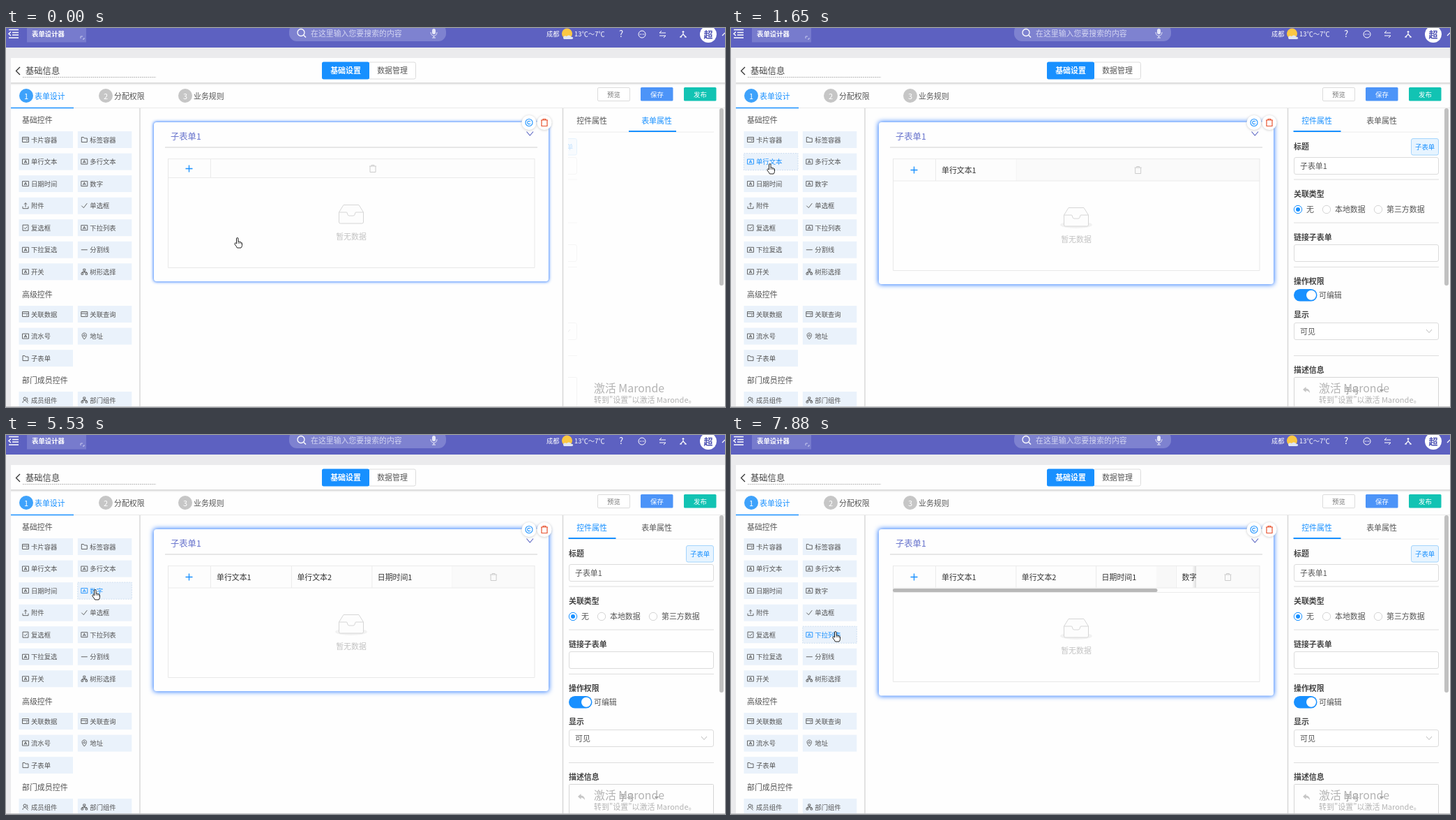
An HTML page for the animation above (8000 ms loop, 1031 by 543 pixels).

```html
<!DOCTYPE html>
<html lang="zh-CN">
<head>
<meta charset="utf-8">
<title>表单设计器</title>
<style>
html, body { margin: 0; width: 100%; height: 100%; overflow: hidden; background: #ebebed; }
svg { display: block; font-family: "Noto Sans CJK SC", "Noto Sans CJK", "Noto Sans", sans-serif; }
text { white-space: pre; }
</style>
</head>
<body>
<svg id="stage" width="1031" height="543" viewBox="0 0 1031 543"></svg>
<script>
const BLUE = '#1890ff', INK = '#555', LINE = '#dcdcdc';

// Drawing helpers; text is placed by its left edge and vertical centre.
const text = (x, y, size, s, fill = INK, more = '') =>
  `<text x="${x}" y="${y + size * .38}" font-size="${size}" fill="${fill}" ${more}>${s}</text>`;
const rect = (x, y, w, h, fill, more = '') =>
  `<rect x="${x}" y="${y}" width="${w}" height="${h}" fill="${fill}" ${more}/>`;
const box = (x, y, w, h, stroke = LINE, fill = '#fff', r = 2.5) =>
  rect(x + .5, y + .5, w - 1, h - 1, fill, `rx="${r}" stroke="${stroke}"`);
const path = (d, stroke = INK, width = 1, more = '') =>
  `<path d="${d}" fill="none" stroke="${stroke}" stroke-width="${width}" ${more}/>`;
const circle = (x, y, r, fill, more = '') =>
  `<circle cx="${x}" cy="${y}" r="${r}" fill="${fill}" ${more}/>`;
const hline = (x1, x2, y, color = LINE, width = 1) => path(`M${x1} ${y}H${x2}`, color, width);
const vline = (x, y1, y2, color = '#ebebeb', width = 1) => path(`M${x} ${y1}V${y2}`, color, width);
const at = (x, y, s, more = '') => `<g transform="translate(${x} ${y})" ${more}>${s}</g>`;
const BOLD = 'font-weight="bold"', MID = 'text-anchor="middle"';

const TRASH = 'M-5 -3.5H5M-2 -3.5V-5H2V-3.5M-4 -3.5V5H4V-3.5';
const ICONS = {
  card: 'M-4.5 -3.5H4.5V3.5H-4.5ZM-4.5 -1H4.5M1 1.2H3',
  folder: 'M-4 -3.5H-1L0 -2H4V3.5H-4Z',
  field: 'M-4.5 -3.5H4.5V3.5H-4.5ZM-2 2L0 -2L2 2M-1.2 .8H1.2',
  upload: 'M-4 1V4H4V1M0 2V-4M-2 -2L0 -4L2 -2',
  tick: 'M-4 0L-1 3L4 -3.5',
  check: 'M-4 -4H4V4H-4ZM-2 0L-.5 1.6L2.3 -1.6',
  dash: 'M-4.5 0H4.5',
  tree: 'M-1.5 -4H1.5V-1.5H-1.5ZM0 -1.5V1.5M-3 1.5V.3H3V1.5M-4.3 1.5H-1.7V4H-4.3ZM1.7 1.5H4.3V4H1.7Z',
  pin: 'M0 4.5C-5 -1 -3.5 -4.5 0 -4.5S5 -1 0 4.5ZM-1.3 -1A1.3 1.3 0 1 0 1.3 -1A1.3 1.3 0 1 0 -1.3 -1',
  user: 'M-3 -2A2 2 0 1 0 1 -2A2 2 0 1 0 -3 -2M-4 4C-4 0 0 0 1 2L3.5 4.5M2 -3.5Q4 -2 2 .5L4 2'
};
const GROUPS = [
  [132, '基础控件', 'card 卡片容器,folder 标签容器,field 单行文本,field 多行文本,field 日期时间,field 数字,upload 附件,tick 单选框,check 复选框,field 下拉列表,field 下拉复选,dash 分割线,field 开关,tree 树形选择'],
  [382, '高级控件', 'card 关联数据,card 关联查询,field 流水号,pin 地址,folder 子表单'],
  [505, '部门成员控件', 'user 成员组件,tree 部门组件']
];

// time, pointer x, pointer y, hovered control
const STEPS = [
  [0, 333, 308], [400, 290, 292], [520, 228, 264], [640, 161, 239], [790, 66, 211],
  [940, 57, 204, '单行文本'], [1090, 57, 203, '单行文本'], [1650, 57, 202, '单行文本'],
  [3170, 57, 214], [3290, 58, 229, '日期时间'], [3410, 59, 239, '日期时间'],
  [3560, 60, 235, '日期时间'], [3710, 59, 232, '日期时间'], [3830, 59, 229, '日期时间'],
  [5380, 86, 228, '日期时间'], [5530, 129, 229, '数字'], [7040, 130, 230, '数字'],
  [7190, 140, 260, '单选框'], [7340, 147, 275], [7490, 150, 286, '下拉列表'], [7610, 151, 289, '下拉列表']
];
const COLUMN_TIMES = [1370, 2770, 4100, 6350, 7880];
const COLUMNS = ['单行文本1', '单行文本2', '日期时间1', '数字1'];

function topBar() {
  const white = (d, w = 1.2) => path(d, '#fff', w);
  return rect(0, 0, 1031, 28, '#5d61c1') + rect(30, 0, 85, 20.5, '#777bcd')
    + white('M4 2.5H18M9 6.5H18M9 10H18M4 14H18M7 5.5L4 8.3L7 11', 1.5)
    + text(37, 8, 9.4, '表单设计器', '#fff', BOLD)
    + path('M107 12H110M107 12V15M110 16H112V14', '#c8caef')
    + rect(406, -6, 225, 25, '#7e82d0', 'rx="11"')
    + circle(423, 6.5, 5, 'none', 'stroke="#fff" stroke-width="1.3"') + white('M427 10.5L430 13.5', 1.4)
    + text(437, 8, 10.9, '在这里输入您要搜索的内容', '#d3d5f2')
    + rect(611, 1, 5, 8, '#e6e7f8', 'rx="2.5"') + path('M609 6C609 13 618 13 618 6M613.5 11V14M611 14H616', '#e6e7f8')
    + text(775, 8.5, 9.2, '成都', '#fff') + circle(804.5, 8, 7.5, '#fbc743')
    + `<path d="M800 16C797 12 802 10 804 12C807 9 810 11 810 12.5C814 12.5 814 16 811 16Z" fill="#dfe5f4"/>`
    + text(815, 8.5, 9.4, '13℃～7℃', '#fff')
    + text(882, 8.5, 13, '?', '#fff', MID)
    + circle(912, 9, 5, 'none', 'stroke="#fff"') + white('M909 9H910M911.5 9H912.5M914 9H915', 1.3)
    + white('M946 7H937L940 4M937 11H946L943 14', 1)
    + white('M971 4V9L967 13M971 9L975 13M969.5 5.5H972.5M966 13H969M973 13H976', 1.2)
    + circle(1007, 9, 12, '#fff') + text(1007, 9, 13, '超', '#4d52b4', `${BOLD} ${MID}`)
    + white('M1027 11L1031 7');
}

function pageHead() {
  const step = (x, n, label, on) => circle(x, 97, 10, on ? '#3ea2fb' : '#c6c6c6')
    + text(x, 97.5, 11, n, '#fff', MID) + text(x + 12, 97.5, 10.95, label, on ? BLUE : INK);
  const button = (x, label, fill) => rect(x, 85, 46.5, 19.5, fill, 'rx="1.5"')
    + text(x + 23.5, 95, 9.4, label, '#fff', MID);
  return rect(7, 43, 1024, 500, '#fefefe')
    + path('M20 56L14.5 61.5L20 67', '#333', 1.3) + text(28, 61.5, 12.3, '基础信息', '#444')
    + path('M24 70.5H215', '#aaa', 1, 'stroke-dasharray="1.6 1.2"')
    + box(519, 48.5, 69, 25) + rect(453, 48.5, 68, 25, BLUE, 'rx="2.5"')
    + text(487, 61, 10.95, '基础设置', '#fff', `${BOLD} ${MID}`) + text(554, 61, 10.95, '数据管理', INK, MID)
    + hline(7, 1031, 79, '#dedede', 2) + hline(7, 1031, 80.7, '#f1f1f1', 1.5)
    + step(29, 1, '表单设计', true) + step(143, 2, '分配权限') + step(257, 3, '业务规则')
    + box(848, 85, 47, 20, LINE, '#fff', 1.5) + text(871.5, 95, 9.4, '预览', '#777', MID)
    + button(910, '保存', '#4c94f8') + button(972, '发布', '#12c3b3')
    + hline(7, 1031, 114.5, '#e9e9e9') + hline(7, 97, 114.5, BLUE, 1.6)
    + vline(192, 115, 543, '#d8d8d8', 1.5) + vline(798.5, 115, 543, '#d8d8d8', 1.5)
    + rect(1023, 115, 6, 254, '#c1c1c1', 'rx="3"');
}

function sidebar(hover) {
  return GROUPS.map(([y, title, items]) => text(23, y, 10.95, title) + items.split(',').map((item, i) => {
    const [icon, label] = item.split(' '), on = label === hover, color = on ? BLUE : INK;
    const x = i % 2 * 84.3, cy = y + 28 + (i >> 1) * 31.55;
    return rect(18.5 + x, cy - 12, 77.5, 24, '#eaf2fb',
        on ? `stroke="#c5d9ee" stroke-width=".8" stroke-dasharray="2 1.5"` : '')
      + at(28 + x, cy, path(ICONS[icon], color, .9)) + text(36 + x, cy, 9.35, label, color);
  }).join('')).join('');
}

function table(n, fresh) {
  const grow = n > 3 ? 10 : n ? 4 : 0, head = n ? 219 : 214.5, bodyEnd = 344 + grow;
  const wide = n > 3, width = wide ? 114.8 : 115.4, left = i => 294 + i * width;
  let s = rect(232, 187, 526, head - 187, '#fdfdfd');
  for (let i = 0; i < Math.min(n, 4); i++)
    s += text(left(i) + 8, 203.5, 10.9, COLUMNS[i], '#333') + vline(left(i + 1), 187.5, head);
  const trashLeft = n === 5 ? 667 : left(n);
  if (n === 5) s += rect(610, 188, 27, 31, '#f8f8f8') + rect(661, 188, 6, 31, 'url(#edge)');
  if (n !== 4) s += rect(trashLeft, 188, 758 - trashLeft, head - 188, n ? '#fafafa' : '#fdfdfd')
    + at((trashLeft + 758) / 2, n ? 203.5 : 201.5, path(TRASH, '#ccc'));
  s += vline(293.5, 187.5, head) + hline(232, 758, 187.5, '#ebebeb') + hline(232, 758, head, '#ebebeb')
    + path(`M232.5 187V${bodyEnd - .5}H758V187`, '#e8e8e8')
    + at(262.5, n ? 203.5 : 201.5, path('M-5 0H5M0 -5V5', BLUE, 1.3));
  if (wide) s += rect(232, 220, n === 5 ? 379.5 : 451, 5, '#b8b8b8', 'rx="2.5"') + hline(232, 758, 225.5, '#ebebeb');
  const tray = (fresh ? '' : '<ellipse cy="11" rx="23" ry="5" fill="#f2f2f2"/>')
    + path('M-17.5 -3L-11 -13.5H11L17.5 -3V11Q17.5 13 15.5 13H-15.5Q-17.5 13 -17.5 11ZM-17.5 -3H-7Q-5.5 -3 -5.5 -1Q-5 2 -3 2H3Q5 2 5.5 -1Q5.5 -3 7 -3H17.5',
      '#d6d6d6', 1, 'style="fill:#fdfdfd"');
  return s + at(495, 267 + grow, tray) + text(495, 299 + grow, 10.95, '暂无数据', '#c2c2c2', MID);
}

function card(n, fresh) {
  const h = 228 + (n > 3 ? 10.5 : n ? 4 : 0);
  const badge = (x, icon) => circle(x, 136, 11, '#aaa', 'opacity=".45" style="filter:blur(1.5px)"')
    + circle(x, 135.5, 10.5, '#fff') + at(x, 135.5, icon);
  return rect(211.5, 134.5, 567, h + 1, '#1a70ff', `rx="4" style="filter:blur(${fresh ? 1.9 : 3.9}px)"`)
    + rect(212, 135, 566, h, '#fefefe', 'rx="4"')
    + text(236, 155.5, 12.3, '子表单1', '#6672cc') + hline(228, 762, 171, '#d2d2d2', 1.2)
    + path('M746.5 148.5L751.3 154L756 148.5', '#5560c0', 1.1)
    + badge(750, circle(0, 0, 5, 'none', `stroke="${BLUE}" stroke-width="1.1"`) + path('M2 -1.3A2.3 2.3 0 1 0 2 1.3', BLUE, 1.1))
    + badge(772, path(TRASH, '#e8532f', 1.2))
    + table(n, fresh);
}

function fields() {
  const label = (y, s) => text(807, y, 10.95, s, '#444', BOLD);
  const rule = y => hline(807, 1015, y, '#dedede');
  const radio = (x, s, on) => circle(x, 260, 5.7, '#fff', `stroke="${on ? BLUE : '#d5d5d5'}"`)
    + (on ? circle(x, 260, 3, BLUE) : '') + text(x + 12, 260, 10.95, s);
  return label(169.5, '标题') + box(975, 158, 40, 24.5, '#a3d4fd', '#e7f4ff') + text(981, 170.5, 9.4, '子表单', BLUE)
    + box(807, 185, 208, 25) + text(816, 197.5, 10.9, '子表单1') + rule(217)
    + label(237.5, '关联类型') + radio(813, '无', true) + radio(854, '本地数据') + radio(928, '第三方数据') + rule(279)
    + label(299.5, '链接子表单') + box(807, 310, 208, 25) + rule(342.5)
    + label(362.5, '操作权限') + rect(807, 374, 33.5, 17.5, BLUE, 'rx="8.75"') + circle(832, 382.7, 7, '#fff')
    + text(843, 382.5, 10.95, '可编辑')
    + label(411, '显示') + box(807, 422, 208, 25) + text(816, 435, 10.95, '可见')
    + path('M997 432L1001 436.5L1005 432', '#bbb') + rule(469.5)
    + label(490, '描述信息') + box(807, 500, 208, 60, '#d5d5d5', '#fefefe', 1)
    + `<path d="M820 518L824.5 514V516.5Q830 517 830 523Q828 519.5 824.5 519.5V522Z" fill="#c6c6c6"/>`
    + text(879, 519.5, 10.95, '字号', '#888') + `<path d="M930 518H936L933 521Z" fill="#777"/>`;
}

function panel(t) {
  const [shift, opacity, bar] = t < 130 ? [-196, .25, 893] : t < 280 ? [-25, .85, 816] : [0, 1, 806.5];
  const formTab = t < 130;
  return text(840, 133, 10.95, '控件属性', formTab ? INK : BLUE, MID)
    + text(933, 133, 10.95, '表单属性', formTab ? BLUE : INK, MID)
    + hline(807, 1015, 149, '#ececec') + hline(bar, bar + 68, 148, BLUE, 2.2)
    + `<g clip-path="url(#panel)">${at(shift, 0, fields(), `opacity="${opacity}"`)}</g>`;
}

const watermark = () => text(843, 515.5, 15.9, '激活 Maronde', '#b3b3b3')
  + text(843, 532.5, 11, '转到"设置"以激活 Maronde。', '#b3b3b3') + rect(0, 542, 1031, 1, '#c4c4c6');

const pointer = (x, y) => at(x, y,
  `<path d="M-2.5 1V-6Q-2.5 -7.5 -1.2 -7.5T0 -6V-2Q1.8 -2.8 2.2 -1.3Q3.8 -2 4.2 -.6Q5.5 -.8 5.5 .8V3.5Q5.5 5 4 7H-1.5Q-2.5 5 -5 1.8Q-5.5 .3 -4.3 0Q-3.5 0 -2.5 1Z" fill="#fff" stroke="#222"/>`
  + path('M0 -2V1M2.2 -1.3V1M4.2 -.6V1.5', '#222', .7));

const DEFS = `<defs><clipPath id="panel">${rect(806, 150, 210, 393, '#fff')}</clipPath>
  <linearGradient id="edge"><stop stop-color="#000" stop-opacity="0"/><stop offset="1" stop-color="#000" stop-opacity=".13"/></linearGradient></defs>`;
const backdrop = DEFS + rect(0, 0, 1031, 543, '#ebebed') + topBar() + pageHead();
const stage = document.getElementById('stage');
const start = performance.now();
let shown = '';

function draw() {
  const t = (performance.now() - start) % 8000;
  const [, x, y, hover] = STEPS.filter(s => s[0] <= t).pop();
  const columns = COLUMN_TIMES.filter(c => c <= t).length;
  const scene = backdrop + sidebar(hover) + card(columns, t < 130) + panel(t) + watermark() + pointer(x, y);
  if (scene !== shown) stage.innerHTML = shown = scene;
  requestAnimationFrame(draw);
}
draw();
</script>
</body>
</html>
```
